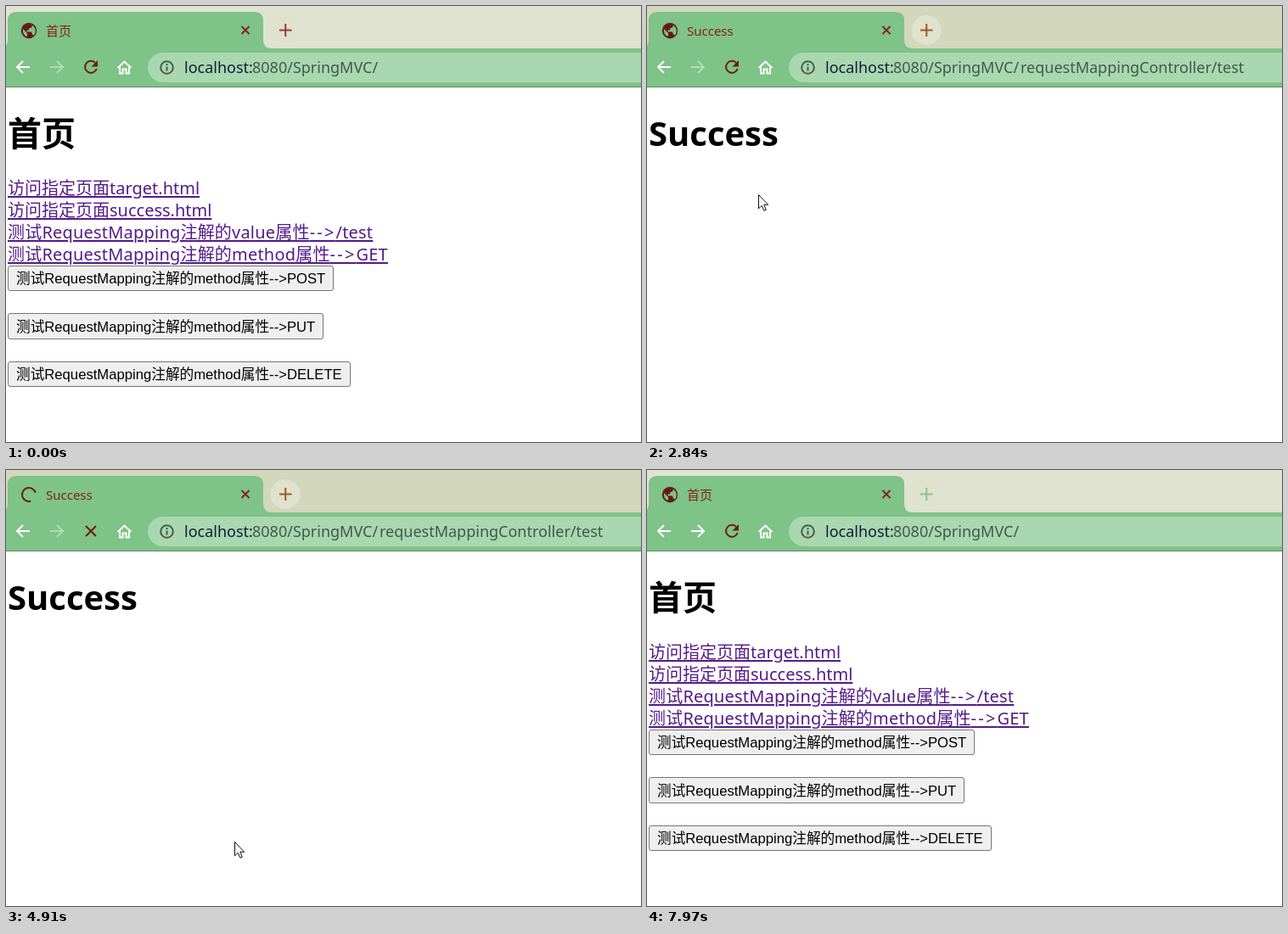
These frames come from a looping animation (748x514 px, 8160 ms). An HTML page:

```html
<!DOCTYPE html>
<html lang="zh-CN">
<head>
<meta charset="utf-8">
<style>
html, body { margin: 0; width: 100%; height: 100%; overflow: hidden; background: #fff; }
svg { position: absolute; left: 0; top: 0; }
text, .links { font-family: "Noto Sans", "Noto Sans CJK SC", "Noto Sans CJK", sans-serif; white-space: nowrap; }
p { margin: 0; height: 26px; }
.links {
  position: absolute; left: 2px; top: 202px; font-size: 20px; line-height: 26px; color: #551a8b;
  text-decoration: underline; text-decoration-thickness: 1.5px; text-underline-offset: 2px;
}
.wide { letter-spacing: .2px; }
.wide i { font-style: normal; letter-spacing: 2.2px; }
.btn text { font: 16.667px "Liberation Sans", "Noto Sans CJK SC", "Noto Sans CJK", sans-serif; }
.btn rect { fill: #efefef; stroke: #767676; }
.btn.hover rect { fill: #e5e5e5; stroke: #4f4f4f; }
.btn.press rect { fill: #f5f5f5; stroke: #8d8d8d; }
.tab { font-size: 15px; fill: #86201c; }
.url { font-size: 18px; fill: #40594c; }
.url.host { fill: #10203a; }
.head { font-size: 40px; font-weight: 700; }
.line { fill: none; stroke-width: 2; }
.white { stroke: #fff; }
.red { stroke: #701c14; }
</style>
</head>
<body>
<svg width="748" height="514">
  <rect id="bar" width="748" height="50"/>
  <g fill="#7ec387">
    <path d="M-8 50Q2 50 2 40V17Q2 7 12 7H293Q303 7 303 17V40Q303 50 313 50Z"/>
    <rect y="50" width="748" height="45"/>
  </g>
  <rect y="95" width="748" height="1" fill="#5b8a62"/>
  <circle cx="329" cy="28.5" r="17.5" fill="#dfe2cd"/>
  <path id="plus" class="line" d="M322 28.5h14.5M329.25 21v15"/>
  <path class="line" d="M277.5 24l9 9m0-9l-9 9" stroke="#8a1f24"/>

  <g id="globe">
    <circle cx="27" cy="29" r="9.2" fill="#651a16"/>
    <path d="M20 27l5 5v4q-6-2-5-9M27 21.5l4 1-1 3-3 1v2h-3l1 2h5l1 3 2 1q4-6-1-11-2-2-5-2Z" fill="#7ec387"/>
  </g>
  <path id="spin" class="line red" d="M27 21a8 8 0 1 1-8 8"/>
  <text id="title" class="tab" x="47" y="34.5"></text>

  <circle id="backHover" cx="20" cy="72" r="17" fill="#000" opacity=".03"/>
  <path class="line white" d="M28 72H13.5M20 65l-7 7 7 7"/>
  <path id="forward" class="line white" d="M52 72h14.5M60 65l7 7-7 7"/>
  <g id="reload">
    <path class="line red" d="M105.5 67.5A7 7 0 1 0 106.7 74"/>
    <path d="M108 64v7.5h-7.5Z" fill="#701c14"/>
  </g>
  <path id="stop" class="line red" d="M94 66l12 12m0-12l-12 12"/>
  <path class="line white" d="M131.5 73l8-7.5 8 7.5M134 71.5v8h3.5v-5h4v5h3.5v-8"/>

  <rect id="omni" x="167" y="55" width="620" height="35" rx="17.5"/>
  <g class="line" stroke="#465c4d">
    <circle cx="189.5" cy="72.5" r="7.3"/>
    <path d="M189.5 71.5v5M189.5 68v2"/>
  </g>
  <text class="url host" x="210" y="79">localhost:</text>
  <text class="url" x="290" y="79">8080/SpringMVC/</text>
  <text id="path" class="url" x="440" y="79">requestMappingController/test</text>
  <text id="head" class="head" x="2" y="165"></text>
</svg>

<div id="index">
  <div class="links">
    <p>访问指定页面target.html</p>
    <p>访问指定页面success.html</p>
    <p class="wide">测试RequestMapping注解的value属性<i>--&gt;</i>/test</p>
    <p class="wide">测试RequestMapping注解的method属性<i>--&gt;</i>GET</p>
  </div>
  <svg id="buttons" width="748" height="514"></svg>
</div>

<svg width="748" height="514">
  <path id="cursor" d="M.5 .5V16.8L4.3 13.3 6.9 19.3 9.3 18.3 6.8 12.3H11.7Z" fill="#fff" stroke="#111"/>
</svg>

<script>
const $ = id => document.getElementById(id);
const show = (id, on) => $(id).style.display = on ? "" : "none";
const LOOP = 8160, STEP = 69.1, START = 90;

const buttons = [
  { verb: "POST", y: 306, w: 384, h: 30 },
  { verb: "PUT", y: 362, w: 372, h: 31 },
  { verb: "DELETE", y: 419, w: 404, h: 30 }
];
$("buttons").innerHTML = buttons.map(b => `<g class="btn">
  <rect x="2.5" y="${b.y + .5}" width="${b.w - 1}" height="${b.h - 1}" rx="2.5"/>
  <text x="12" y="${b.y + b.h - 9}">测试RequestMapping注解的method属性--&gt;${b.verb}</text></g>`).join("");
const groups = document.querySelectorAll(".btn");

// Pointer tip: time, x, y
const track = [
  [90, 616, 500], [850, 280, 412], [1270, 270, 393], [1400, 270, 393], [1470, 269, 391],
  [1600, 269, 389], [1740, 269, 389], [2000, 269, 387], [2550, 269, 387], [2830, 131, 222],
  [2910, 131, 222], [3400, 20, 82], [3750, 20, 82], [4230, 258, 425], [4560, 269, 440],
  [4700, 269, 440], [4900, 269, 438], [5120, 269, 438], [5750, 19, 83], [5830, 19, 83],
  [5900, 20, 82], [6180, 20, 82], [6780, 373, 95], [6860, 373, 95], [7490, 662, 489]
];

function pointer(t) {
  // The pointer is sampled about 14 times a second
  t = START + Math.floor((t - START) / STEP + .35) * STEP;
  const i = track.findIndex(k => k[0] > t);
  if (i < 0) return track[track.length - 1].slice(1);
  if (i === 0) return track[0].slice(1);
  const [t0, x0, y0] = track[i - 1], [t1, x1, y1] = track[i];
  const f = (t - t0) / (t1 - t0);
  return [x0 + (x1 - x0) * f, y0 + (y1 - y0) * f].map(Math.round);
}

function draw(t) {
  const within = (...spans) => spans.some(([a, b]) => t >= a && t < b);
  const success = within([2010, 3610], [4910, 6110]);
  const loading = within([1880, 2350], [4840, 5120]);
  const pressed = within([1740, 1880], [4700, 4840]);
  const focused = within([1740, 7970]);
  const visible = within([START, 7490]);
  const [x, y] = pointer(t);

  $("bar").style.fill = focused ? "#d3d7bb" : "#e0e3d0";
  $("plus").style.stroke = focused ? "#9c5a1e" : t < 1740 ? "#9c3a35" : "#84c58b";
  $("title").textContent = $("head").textContent = success ? "Success" : "首页";
  show("path", success);
  show("index", !success);
  $("forward").style.opacity = !success && t > 3610 ? 1 : .4;

  show("globe", !loading);
  show("reload", !loading);
  show("spin", loading);
  show("stop", loading);
  $("spin").setAttribute("transform", `rotate(${t * .4} 27 29)`);

  show("backHover", visible && Math.hypot(x - 20, y - 72) < 17);
  $("omni").style.fill = visible && x > 167 && y > 54 && y < 96 ? "#a4d1ab" : "#a9d7b0";

  buttons.forEach((b, i) => {
    const over = visible && x >= 2 && x < 2 + b.w && y >= b.y && y < b.y + b.h;
    groups[i].setAttribute("class", "btn" + (over ? pressed ? " press" : " hover" : ""));
  });
  show("cursor", visible);
  $("cursor").setAttribute("transform", `translate(${x} ${y})`);
}

const begin = performance.now();
function frame() {
  draw((performance.now() - begin) % LOOP);
  requestAnimationFrame(frame);
}
frame();
</script>
</body>
</html>
```
